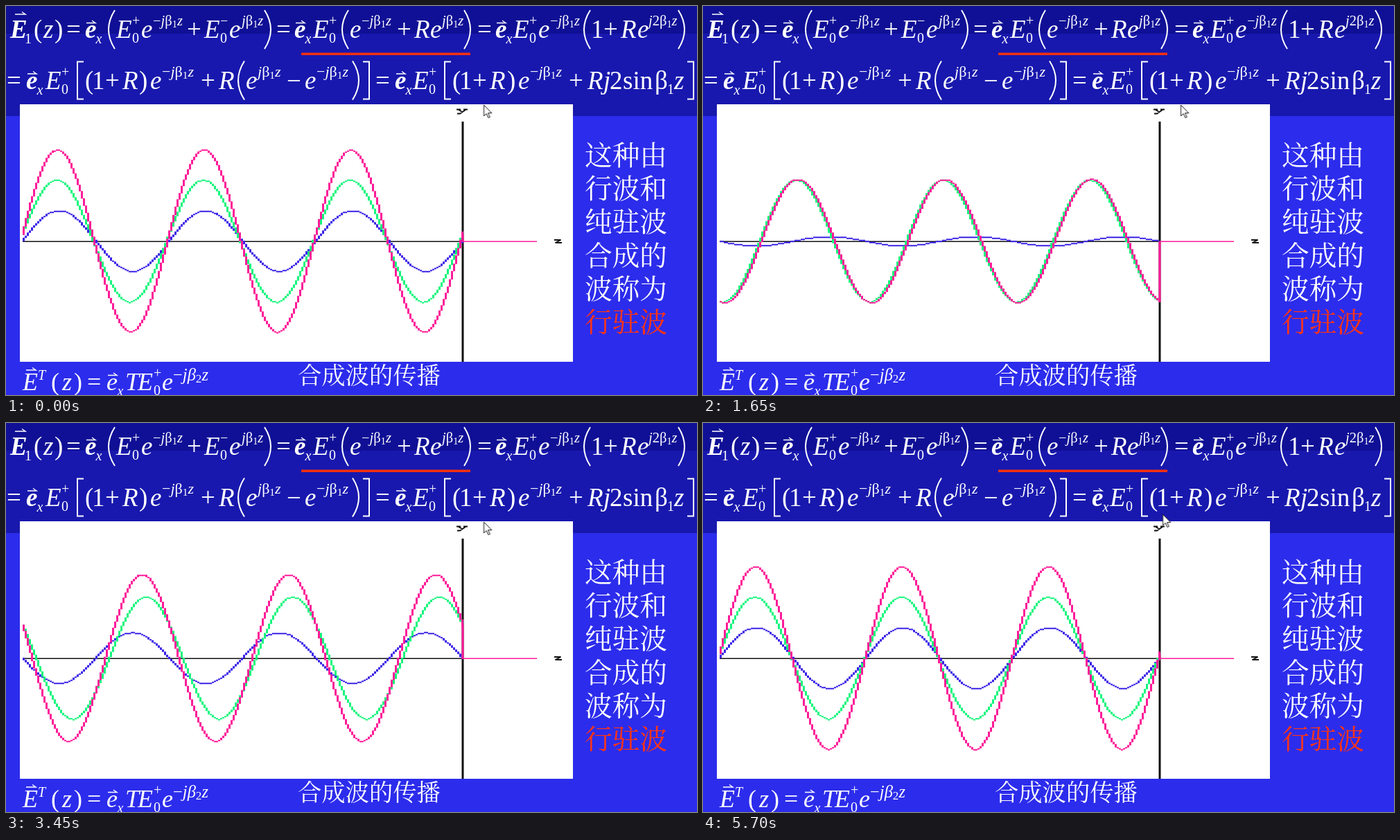
These frames come from a looping animation (997x562 px, 5850 ms). An HTML page with a canvas:

```html
<!DOCTYPE html>
<html lang="zh">
<head>
<meta charset="utf-8">
<title>合成波的传播</title>
<style>
html, body { margin: 0; width: 100%; height: 100%; overflow: hidden; background: #2c2cec; }
svg, canvas { position: absolute; left: 0; top: 0; width: 997px; height: 562px; }
text { font-family: "Liberation Serif", "Times New Roman", serif; fill: #fff; white-space: pre; }
.i { font-style: italic; }
.b { font-style: italic; font-weight: bold; }
.cjk { font-family: "Noto Serif CJK SC", "Noto Sans CJK SC", "Noto Sans CJK", serif; font-weight: 500; }
.line { fill: none; stroke: #fff; stroke-width: 2; }
.thin { fill: none; stroke: #fff; stroke-width: 1.4; }
.ink { fill: none; stroke: #111; stroke-width: 1.8; }
#cursor { animation: nudge 5850ms step-end infinite; }
@keyframes nudge {
  0% { transform: translate(689.5px, 143px); }
  76.923% { transform: translate(663.5px, 132px); }
}
</style>
</head>
<body>
<svg viewBox="0 0 997 562">
  <rect width="997" height="562" fill="#2c2cec"/>
  <rect width="997" height="159" fill="#1818ae"/>
  <rect width="997" height="40" fill="#101096"/>
  <rect x="426" y="67.5" width="244" height="3.5" fill="#f5300f"/>
  <rect x="20" y="142" width="798" height="372" fill="#fff"/>
  <g id="words"></g>
  <path class="ink" d="M650 149.5h6M660 149.5h6M653 150l6 3.5M663 150l-8 5.5h-4"/>
  <path class="ink" d="M791 338h9.5l-8 4h9.5"/>
</svg>
<canvas id="plot" width="997" height="562"></canvas>
<svg viewBox="0 0 997 562">
  <path id="cursor" d="M0 0v16l3.7-3.5 2.7 6 2.4-1-2.7-5.8h5.2z" fill="#fff" stroke="#111"/>
</svg>
<script>
const words = document.getElementById('words');
const add = html => words.insertAdjacentHTML('beforeend', html);
const put = (x, y, size, cls, s) =>
  add(`<text x="${x}" y="${y}" font-size="${size}" class="${cls}">${s}</text>`);
const path = (d, cls = 'line') => add(`<path class="${cls}" d="${d}"/>`);

const arrow = (x, y, w) => path(`M${x} ${y}h${w}l-5-3.5`, 'thin');

function bracket(kind, x, y) {
  const top = y - 40, h = 56;
  if (kind === '(') path(`M${x + 10} ${top}q-18 ${h / 2} 0 ${h}`);
  if (kind === ')') path(`M${x} ${top}q18 ${h / 2} 0 ${h}`);
  if (kind === '[') path(`M${x + 11} ${top + 1}h-9v${h - 2}h9`);
  if (kind === ']') path(`M${x} ${top + 1}h9v${h - 2}h-9`);
}

function power(x, y, size, s, beta, index) {
  const [head, tail] = s.split('j');
  put(x, y, size, '', `${head}<tspan class="i">j</tspan>${tail}<tspan class="${beta}">β</tspan>` +
    `<tspan dy="3" font-size="${size * .7}">${index}</tspan><tspan dy="-3" class="i">z</tspan>`);
}

// Tokens read kind, x, colon, text: v = unit vector, E = amplitude, ^ = exponent, B = tall bracket.
function formula(y, size, sup, spec, { vec = 'b', beta = '', index = 1, lift = 18 } = {}) {
  for (const token of spec.trim().split(/\s+/)) {
    const [head, s] = token.split(':');
    const kind = head[0], x = +head.slice(1);
    if (kind === 'v') {
      put(x, y, size, vec, 'e');
      put(x + 15.5, y + 8, 20, 'i', 'x');
      arrow(x + 2, y - 21.5, 13);
    } else if (kind === 'E') {
      put(x, y, size, 'i', 'E');
      put(x + 23, y - 18, 20, '', s);
      put(x + 23, y + 7, 20, '', '0');
    } else if (kind === '^') power(x, y - lift, sup, s, beta, index);
    else if (kind === 'B') bracket(s, x, y);
    else put(x, y, size, kind, s);
  }
}

formula(46, 37, 20.5, `b6:E r40:( i54:z r70:) r87:= v114 B147:( E159:+ i195:e ^212:−j r261:+
  E286:− i322:e ^340:j B373:) r390:= v416 E443:+ B484:( i496:e ^513:−j r564:+ i589:R i612:e
  ^629:j B661:) r680:= v706 E732:+ i768:e ^785:−j B833:( r844:1 r862:+ i887:R i911:e
  ^927:j2 B970:)`);
put(27, 54, 20, '', '1');
arrow(13, 12, 15);

formula(119.5, 37, 22, `r1:= v29 E57:+ B101:[ r114:( r124:1 r143:+ i168:R r192:) i208:e ^225:−j
  r281:+ i307:R B334:( i346:e ^363:j r405:− i431:e ^448:−j B500:) B515:] r533:= v561 E587:+
  B631:[ r644:( r654:1 r673:+ i698:R r723:) i739:e ^756:−j r812:+ i839:R i862:j r871:2
  r890:sin r936:β i964:z B983:]`);
put(954, 127, 20, '', '1');

formula(555, 36, 24.5, `i24:E r65:( i81:z r98:) r117:= v145 i172:T E190:+ i225:e ^241:−j`,
  { vec: 'i', beta: 'i', index: 2, lift: 14 });
put(46, 540, 20, 'i', 'T');
arrow(29, 526, 14);

['这种由', '行波和', '纯驻波', '合成的', '波称为', '行驻波'].forEach((s, i) => {
  const red = i === 5 ? ' style="fill:#ff3414"' : '';
  add(`<text x="835" y="${230 + i * 48.2}" font-size="39.7" class="cjk"${red}>${s}</text>`);
});
put(421, 545.5, 34.3, 'cjk', '合成波的传播');

const ctx = document.getElementById('plot').getContext('2d');
const LEFT = 24, RIGHT = 659, MID = 340, COL = 3, ROW = 1.5, AMP = 88;
const K = 6 * Math.PI / (RIGHT - LEFT);
const TICK = 150, TICKS = 39;

const snap = v => Math.round(v / ROW) * ROW;

function box(color, x, y, w, h) {
  ctx.fillStyle = color;
  ctx.fillRect(x, y, w, h);
}

// Each coarse column holds one upright run, like a line on wide pixels.
function curve(color, f) {
  for (let x = LEFT; x < RIGHT; x += COL) {
    const a = snap(f(x - LEFT)), b = snap(f(x + COL - LEFT));
    box(color, x, MID - Math.max(a, b) - ROW / 2, COL, Math.max(ROW, Math.abs(a - b)) + .5);
  }
}

function draw(step) {
  const phase = step / 6 - .11, pink = '#ff1a98';
  const going = x => AMP * Math.sin(K * x - phase);
  const standing = x => AMP / 2 * Math.cos(phase) * Math.sin(K * x);
  ctx.clearRect(0, 0, 997, 562);
  box('#111', LEFT, MID - .5, RIGHT - LEFT, ROW);
  box('#111', RIGHT - 1.5, 167, 3, 347);
  curve('#3a22e6', standing);
  curve('#14f57c', going);
  curve(pink, x => going(x) + standing(x));
  const end = MID - going(RIGHT - LEFT);
  box(pink, RIGHT - 1.5, Math.min(end, MID), 3, Math.abs(end - MID) + 1);
  box(pink, RIGHT, MID - .5, 107, ROW);
}

let shown = -1;
function tick() {
  const step = Math.floor(performance.now() / TICK) % TICKS;
  if (step !== shown) draw(shown = step);
  requestAnimationFrame(tick);
}
tick();
</script>
</body>
</html>
```
